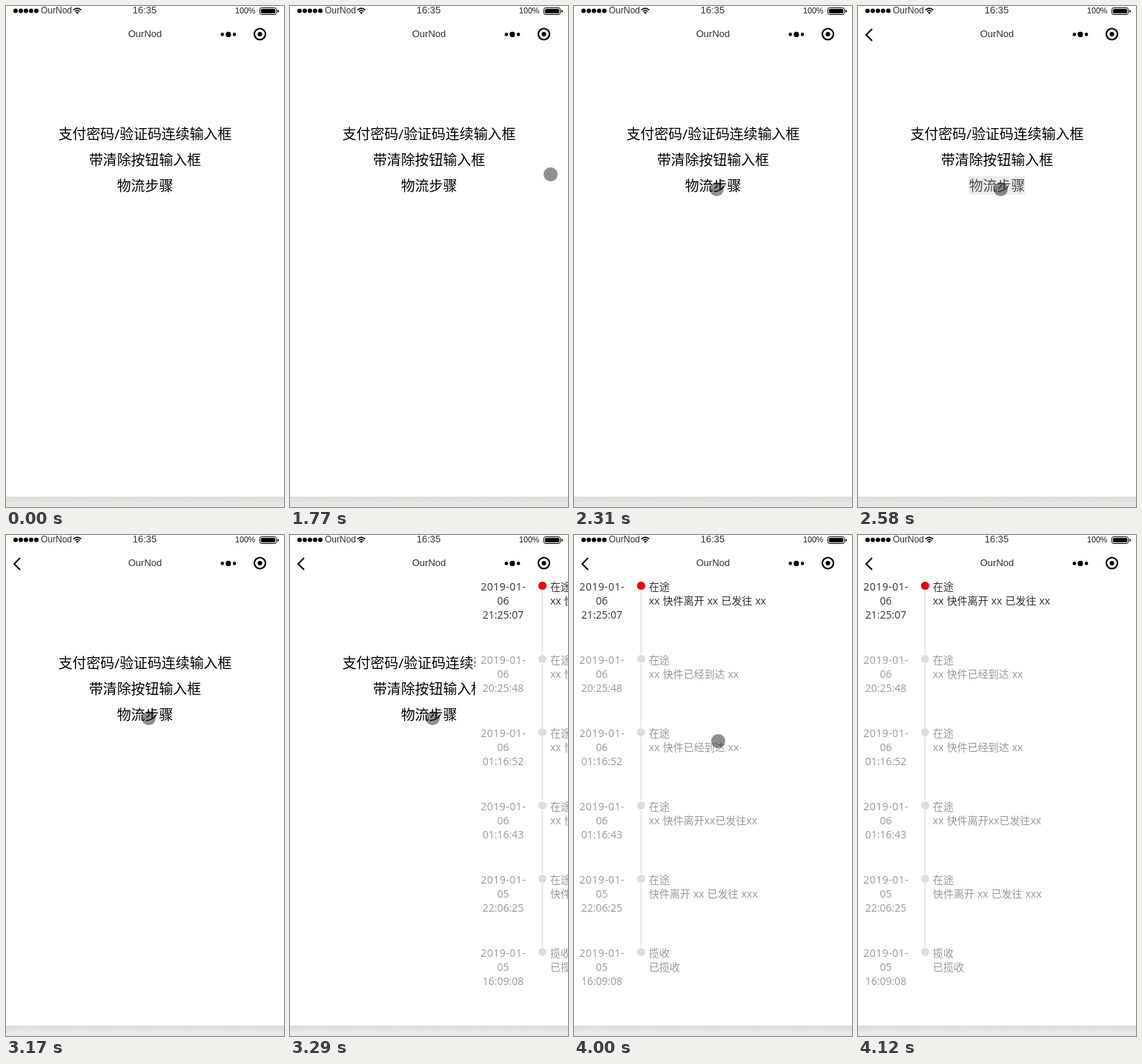
These frames come from a looping animation (375 by 677 pixels, 7.14 s). An HTML page:

```html
<!DOCTYPE html>
<html lang="zh-CN">
<head>
<meta charset="utf-8">
<title>物流步骤</title>
<style>
  html, body { margin: 0; width: 100%; height: 100%; overflow: hidden; background: #fff; }
  svg { display: block; width: 100%; height: 100%; }
  .bar { font-family: "Liberation Sans", Arial, sans-serif; fill: #333; }
  .menu { font: 350 18.9px "Noto Sans CJK SC", "Noto Sans CJK", sans-serif; text-anchor: middle; }
  .slash { font-family: "Open Sans", sans-serif; font-weight: 500; }
  .steps { font: 14px "Open Sans", "Noto Sans CJK SC", "Noto Sans CJK", sans-serif; fill: #999; word-spacing: .4px; }
  .steps .now { fill: #333; }
  .date { text-anchor: middle; }
  .day { letter-spacing: .5px; }
</style>
</head>
<body>
<svg viewBox="0 0 375 677" xmlns="http://www.w3.org/2000/svg">
  <defs>
    <linearGradient id="shade" x1="0" y1="0" x2="0" y2="1">
      <stop offset="0" stop-color="#dcdcd9"/>
      <stop offset=".7" stop-color="#e8e8e4"/>
    </linearGradient>
  </defs>
  <rect width="375" height="677" fill="#fff"/>
  <rect y="663" width="375" height="14" fill="url(#shade)"/>

  <g class="bar">
    <g id="signal" fill="#000"></g>
    <text x="47" y="10" font-size="12">OurNod</text>
    <g fill="none" stroke="#000" stroke-width="1.5">
      <path d="M91 5.4Q96.2 .8 101.4 5.4M92.9 7.5Q96.2 4.6 99.5 7.5"/>
      <path d="M94.2 8.8Q96.2 7.3 98.2 8.8L96.2 10.9Z" fill="#000" stroke="none"/>
    </g>
    <text x="187" y="10" font-size="13" text-anchor="middle">16:35</text>
    <text x="309" y="10" font-size="10.7" fill="#111">100%</text>
    <rect x="342.5" y="2.5" width="22" height="9" rx="2" fill="none" stroke="#000"/>
    <rect x="344" y="4" width="19" height="6" rx="1" fill="#000"/>
    <path d="M366 5Q368 5.3 368 7T366 9Z" fill="#000"/>

    <text x="187.5" y="42" font-size="13" text-anchor="middle">OurNod</text>
    <g fill="#000">
      <circle cx="291.8" cy="38.4" r="2.3"/>
      <circle cx="299.9" cy="38.4" r="3.6"/>
      <circle cx="308.1" cy="38.4" r="2.3"/>
      <circle cx="342.5" cy="38" r="3.1"/>
      <circle cx="342.5" cy="38" r="7.5" fill="none" stroke="#000" stroke-width="2.2"/>
    </g>
    <path id="back" d="M19 31L11 39L19 47" fill="none" stroke="#000" stroke-width="2"/>
  </g>

  <g class="menu">
    <text x="187.5" y="180">支付密码<tspan class="slash">/</tspan>验证码连续输入框</text>
    <text x="187.5" y="215">带清除按钮输入框</text>
    <g id="link">
      <rect id="hover" x="149.5" y="230" width="76" height="25" fill="#000" fill-opacity=".1"/>
      <text x="187.5" y="250">物流步骤</text>
    </g>
  </g>

  <g id="page" class="steps">
    <rect y="63" width="375" height="600" fill="#fff"/>
  </g>
  <circle id="cursor" r="9.5" fill="#000" fill-opacity=".44"/>
</svg>
<script>
const LOOP = 7140;
const $ = id => document.getElementById(id);

function add(parent, tag, attrs, text) {
  const el = document.createElementNS("http://www.w3.org/2000/svg", tag);
  for (const key in attrs) el.setAttribute(key, attrs[key]);
  if (text) el.textContent = text;
  parent.append(el);
  return el;
}

const show = (el, on) => el.setAttribute("visibility", on ? "visible" : "hidden");

const events = [
  ["06", "21:25:07", "在途", "xx 快件离开 xx 已发往 xx"],
  ["06", "20:25:48", "在途", "xx 快件已经到达 xx"],
  ["06", "01:16:52", "在途", "xx 快件已经到达 xx"],
  ["06", "01:16:43", "在途", "xx 快件离开xx已发往xx"],
  ["05", "22:06:25", "在途", "快件离开 xx 已发往 xxx"],
  ["05", "16:09:08", "揽收", "已揽收"]
];

for (let i = 0; i < 5; i++) add($("signal"), "circle", { cx: 12.9 + i * 7, cy: 6.6, r: 3 });

events.forEach(([day, time, state, note], i) => {
  const row = add($("page"), "g", { transform: `translate(0 ${i * 99})`, class: i ? "" : "now" });
  if (i < events.length - 1) add(row, "rect", { x: 89.5, y: 75, width: 2, height: 86, fill: "#e6e6e6" });
  add(row, "circle", { cx: 90.5, cy: 68.5, r: 5.5, fill: i ? "#ddd" : "#f00000" });
  add(row, "text", { x: 37.8, y: 75, class: "date day" }, "2019-01-");
  add(row, "text", { x: 37.5, y: 94, class: "date" }, day);
  add(row, "text", { x: 37.5, y: 113, class: "date" }, time);
  add(row, "text", { x: 101, y: 75 }, state);
  add(row, "text", { x: 101, y: 94 }, note);
});

// Pointer positions, each held until the next: time, x, y
const moves = [
  [1770, 351.5, 227.5],
  [1890, 274.5, 211.5],
  [2040, 232, 231],
  [2160, 202, 243.5],
  [2310, 192.5, 247.5],
  [4000, 194.5, 278.5]
];

function draw(t) {
  const spot = moves.filter(m => m[0] <= t).pop();
  show($("cursor"), spot && t < 4120);
  if (spot) {
    $("cursor").setAttribute("cx", spot[1]);
    $("cursor").setAttribute("cy", spot[2]);
  }

  const pressed = t >= 2460 && t < 3170;
  show($("hover"), pressed);
  $("link").setAttribute("opacity", pressed ? 0.7 : 1);
  show($("back"), t >= 2580);

  show($("page"), t >= 3290);
  $("page").setAttribute("transform", `translate(${t < 3440 ? 250 : 0} 0)`);
}

const start = performance.now();
function tick() {
  draw((performance.now() - start) % LOOP);
  requestAnimationFrame(tick);
}
tick();
</script>
</body>
</html>
```
